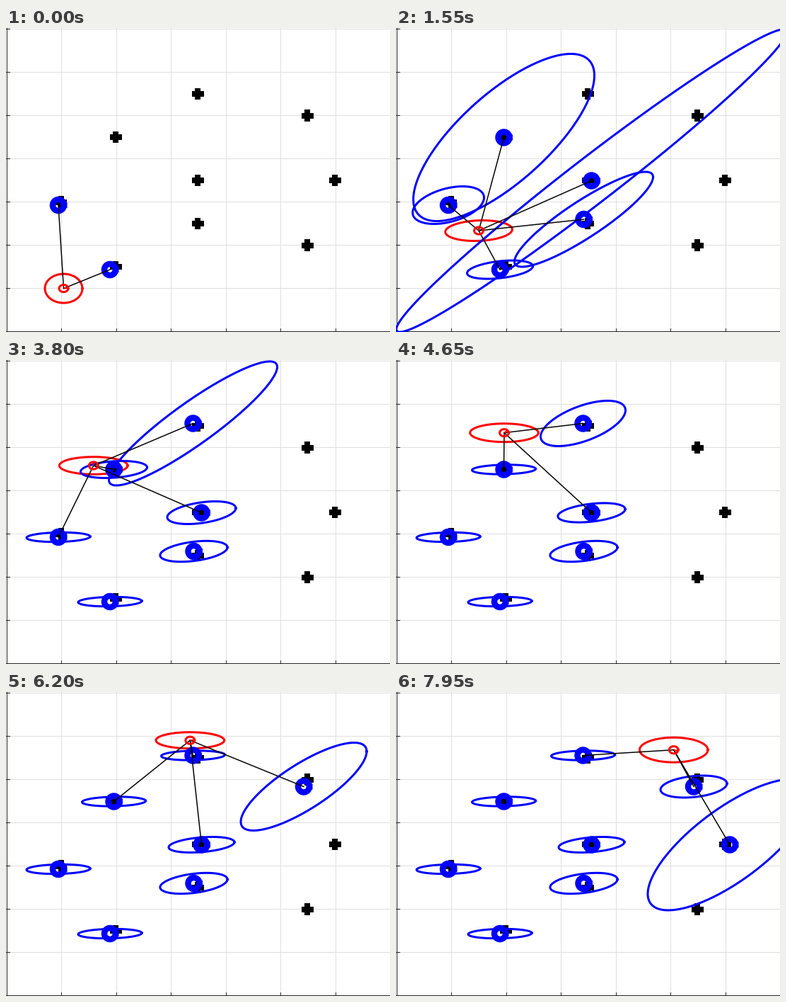
These frames come from a looping animation (543 by 429 pixels, 8000 ms). A matplotlib script:

```python
import numpy as np
import matplotlib
matplotlib.rcParams["toolbar"] = "None"
import matplotlib.pyplot as plt
from matplotlib.animation import FuncAnimation
from matplotlib.patches import Rectangle

W, H, FRAMES = 543, 429, 160
PX = 0.72                      # one pixel in points at 100 dpi
SX, SY = 38.75, 30.55          # pixels per map unit
REACH = 5.1                    # sensor range in map units

fig = plt.figure(figsize=((W + .001) / 100, (H + .001) / 100), dpi=100,
                 facecolor="white")
ax = fig.add_axes([0, 0, 1, 1])
ax.set_xlim(0, W)
ax.set_ylim(H, 0)
ax.axis("off")


def line(x, y, color, width, z, **kw):
    return ax.plot(x, y, color=color, lw=width * PX, zorder=z, **kw)[0]


# grid, axes and ticks
for i in range(8):
    gx, gy = int(77.5 * i) + .5, 61 * i + 1.5
    line([gx, gx], [0, H], "#dfdfdf", 1, 0)
    line([0, W], [gy, gy], "#dfdfdf", 1, 0)
    line([gx, gx], [H - 5, H], "#262626", 1, 1)
    line([0, 5], [gy, gy], "#262626", 1, 1)
line([.5, .5], [0, H], "#262626", 1, 1)
line([0, W], [H - .5, H - .5], "#262626", 1, 1)

# true landmarks in map units
for mx, my in zip([2, 0, 2, 9, 10, 9, 5, 5, 5], [1, 4, 7, 2, 5, 8, 5, 3, 9]):
    cx, cy = 77.7 + SX * mx, 367.6 - 30.5 * my
    for dx, dy in [(8.3, 4), (4, 8.3)]:
        ax.add_patch(Rectangle((cx - dx, cy - dy), 2 * dx, 2 * dy,
                               fc="black", ec="none", zorder=3))

# Estimated landmarks: centre, first sighting, and the uncertainty as
# (frame, half width, half height, correlation); a lone frame means settled
STRIP = (800, 620, .997)
SETTLED = (45, 6.7, .13)
LANDMARKS = [
    (74, 250, 0, [(31, 50.5, 26.5, .4), (51, 46, 9, .3), (76,)]),
    (147, 341, 0, [(31, 46.5, 13, .38), (51, 45, 8.3, .2), (76,)]),
    (152.5, 154.5, 26, [(27, 175, 155, .76), (31, 128, 118, .74),
                        (51, 67, 46.5, .66), (76, 47, 12, .25), (93,)]),
    (276.5, 215.5, 25, [(31, 276, 213.5, .982), (51, 71.5, 45, .76),
                        (76, 48.5, 16, .4), (124, 46.5, 11, .33)]),
    (265.5, 270, 9, [(31, 98, 67, .89), (51, 55, 26.5, .6),
                     (76, 47.6, 14.7, .38)]),
    (264.5, 89.5, 62, [(69, 252, 195, .973), (76, 119, 87.5, .91),
                       (86, 77.5, 50.5, .75), (93, 60, 32, .58), (124,)]),
    (421, 133.5, 120, [(121, 115, 84, .84), (124, 89, 62, .8),
                       (159, 47, 15.5, .28)]),
    (472, 215.5, 154, [(155, 165, 129, .77), (159, 116, 92.5, .75)]),
]

T = np.linspace(0, 2 * np.pi, 181)


def ellipse(c, w, h, rho=0):
    return c[0] + w * np.cos(T), c[1] - h * np.cos(T - np.arccos(rho))


def spread(born, keys, f):
    """Half width, half height and correlation, following power laws in age."""
    k = [key if len(key) > 1 else key + SETTLED for key in keys]
    if k[0][0] > born + 1:
        k.insert(0, (born + 1,) + STRIP)
    frame, w, h, rho = np.array(k, float).T
    age = np.log(max(f - born, 1))
    w, h, q = (np.exp(np.interp(age, np.log(frame - born), np.log(v)))
               for v in (w, h, 1 - rho))
    return w, h, 1 - q


def robot_spread(f):
    w = 48.3 - 21.8 * np.exp(-f / 10)
    h = np.interp(f, [0, 31, 51, 93, 124, 159], [20.5, 14.5, 11.3, 13, 11.5, 17.5])
    return w, h, .12 * np.exp(-((f - 31) / 9) ** 2)


# Robot path: a tight left turn, then smooth legs between (frame, x, y, heading)
LEGS = [(31, 117, 286, 1.56), (51, 119, 225.2, 1.545), (76, 123.7, 149, 1.5),
        (93, 153, 102.7, .7), (124, 260.3, 68.2, .08), (159, 392.7, 81.7, -.33)]


def stride(a):
    return .1 * np.array([SX * np.cos(a), -SY * np.sin(a)])


def robot_path():
    pts = [np.array([81.5, 367.5])]
    for i in range(1, 32):
        pts.append(pts[-1] + stride(min(.1 * i, 1.56)))
    drift = np.array(LEGS[0][1:3]) - pts[-1]
    pts = [p + drift * i / 31 for i, p in enumerate(pts)]
    for (f0, x0, y0, a0), (f1, x1, y1, a1) in zip(LEGS, LEGS[1:]):
        n = f1 - f0
        p0, p1 = np.array([x0, y0]), np.array([x1, y1])
        v0, v1 = n * stride(a0), n * stride(a1)
        for i in range(1, n + 1):
            s = i / n
            b = s * s * (3 - 2 * s)
            pts.append(p0 * (1 - b) + p1 * b + v0 * s * (1 - s) ** 2
                       - v1 * s * s * (1 - s))
    return np.array(pts)


PATH = robot_path()
STEP = np.gradient(PATH, axis=0) / [SX, -SY]
HEADING = np.arctan2(STEP[:, 1], STEP[:, 0])

robot_cov = line([], [], "red", 3, 2)
rings, covs, rays = [], [], []
for i, mark in enumerate(LANDMARKS):
    rings.append(line(*ellipse(mark, 8, 8), "blue", 8.5, 4 + .1 * i))
    covs.append(line([], [], "blue", 3, 4.05 + .1 * i))
    rays.append(line([], [], "black", 1.5, 6))
body = line([], [], "red", 3, 7)
nose = line([], [], "red", 2, 7, solid_capstyle="butt")


def draw(f):
    p = PATH[f]
    robot_cov.set_data(*ellipse(p, *robot_spread(f)))
    for (x, y, born, keys), ring, cov, ray in zip(LANDMARKS, rings, covs, rays):
        ring.set_visible(f >= born)
        cov.set_visible(f > born)
        cov.set_data(*ellipse((x, y), *spread(born, keys, f)))
        dist = np.hypot((x - p[0]) / SX, (y - p[1]) / SY)
        ray.set_visible(f >= born and (dist < REACH or f == born))
        ray.set_data([p[0], x], [p[1], y])
    body.set_data(*ellipse(p, 6.4, 5.1))
    a = HEADING[f]
    nose.set_data([p[0], p[0] + 6.4 * np.cos(a)], [p[1], p[1] - 5.1 * np.sin(a)])
    return [robot_cov, *rings, *covs, *rays, body, nose]


anim = FuncAnimation(fig, draw, frames=FRAMES, interval=50, repeat=True,
                     repeat_delay=0, init_func=lambda: draw(0))
plt.show()
```
